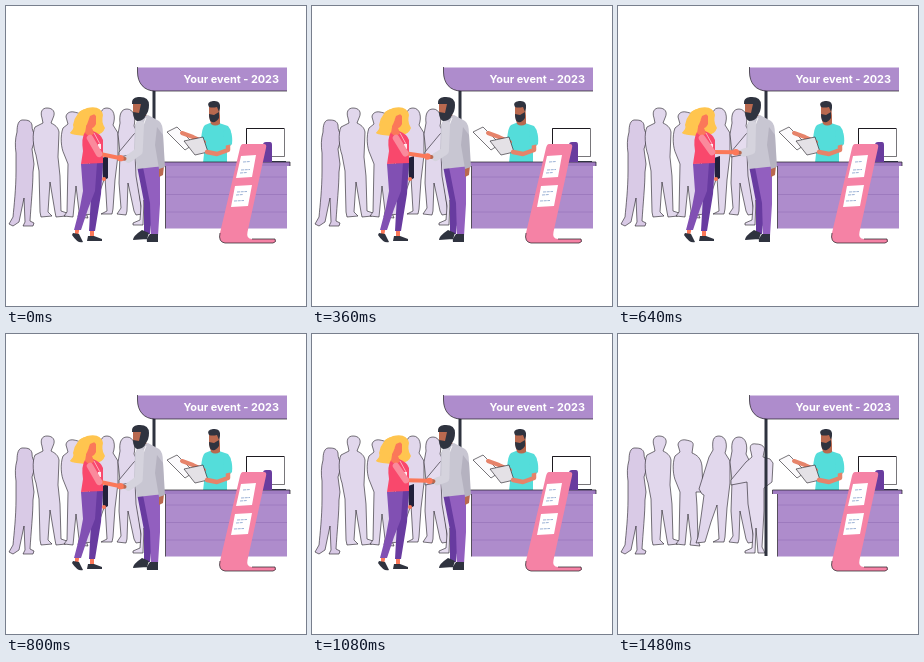
These frames come from a looping animation (300 px wide and 300 px high, 1.52 s). An HTML page:

```html
<!DOCTYPE html>
<html lang="en">
<head>
<meta charset="utf-8">
<title>Event desk</title>
<style>
  html, body { margin: 0; width: 100%; height: 100%; overflow: hidden; background: #fff; }
  svg { display: block; width: 100vw; height: 100vh; }
  text { font: 700 10.9px Inter, sans-serif; fill: #fff; text-anchor: end; }
  .edge { stroke: #1d1a20; stroke-width: .6; stroke-linejoin: round; }
  .rim { fill: none; stroke: #1d1a20; }
  .limb { fill: none; stroke-linecap: round; stroke-linejoin: round; }
  .dark { fill: #2f333f; }
  .tan { fill: #b9694f; }
  .skin { fill: #fb7859; }
</style>
</head>
<body>
<svg viewBox="0 0 300 300">
  <!-- crowd -->
  <g class="edge" fill="#e1d7ec">
    <path fill="#d9cae6" d="M18 114C12 113 11 120 11 126C9 133 9 140 10 147L10 165C10 183 8 200 7 211L3 218L7 220L13 216L18 192L19 216L17 220H27L28 217L24 215C25 199 27 179 27 166L28 158L26 143L30 130C27 126 26 124 26 119C25 115 22 114 18 114Z"/>
    <path d="M41 102C36 102 34 106 36 112L37 117L29 121C26 127 27 141 30 149L33 165L34 206L35 211L46 210L42 206L44 176L49 206L50 211L60 210L61 207L55 205L54 170L52 151L53 126C52 121 49 119 45 117L47 112C50 106 47 102 41 102Z"/>
    <path d="M68 106C63 105 60 108 60 111L62 118L57 122C54 130 55 142 58 148L62 158L61 206L58 210L67 211L70 180L73 205L72 211L82 212L80 207L79 172L78 158L85 158L84 132C83 124 79 121 74 119L75 112C76 108 73 107 68 106Z"/>
    <path d="M101 102C95 102 94 107 95 116L91 123L86 139L81 155L84 160L86 161L83 183L80 203L78 209L87 208L93 188L99 171L101 205L95 208L106 208L107 203L109 174L112 149L112 127L107 119C110 111 108 102 101 102Z"/>
    <path d="M121 103C115 103 113 109 114 117L112 128L114 147L113 177L115 202L111 208L120 209L121 205L122 177L128 205L130 209L136 208L132 176L132 128L128 120C130 112 128 103 121 103Z"/>
    <path fill="#e5dcef" d="M138 110C133 109 131 112 133 118L134 123L128 128L113 146L113 151L129 148L130 170L135 200L134 214L127 217V219H137L138 194L140 219H147L144 213L146 177L146 154L154 148L155 129L152 125L145 123L146 118C148 113 144 110 138 110Z"/>
  </g>

  <!-- booth -->
  <path class="dark" d="M146.500 84h3V222h-3z"/>
  <path fill="#ae8ccc" d="M131.500 61.500H281V85H149C138 85 131.500 77 131.500 66Z"/>
  <path class="rim" stroke-width=".7" d="M131.500 61V66C131.500 77 138 85 149 85H281"/>
  <text x="273" y="77">Your event - 2023</text>

  <!-- clerk -->
  <path fill="#54ddda" d="M204 117L199 119Q196 121 195 134L199 139L197 157H221V143L226 138Q226 124 222 120L213 117Z"/>
  <path class="tan" d="M203 100L213 99L214 110L214 118Q209 121 205 118L203 110Z"/>
  <path class="dark" d="M203 101Q200 96 207 95Q215 94 214 102L213 106L211 101Q206 102 203 101ZM203 108L208 109L213 106L213 112Q210 117 206 116Q203 115 203 108Z"/>
  <path class="edge" fill="#fbfafc" d="M161 126L171 121L188 138L179 144Z"/>
  <path class="limb" stroke="#e6836a" stroke-width="4" d="M198 136L187 131L176 127"/>
  <path class="edge" fill="#e4e1e6" d="M178 135L197 131L202 146L189 149Z"/>
  <path class="limb" stroke="#e6836a" stroke-width="4.500" d="M222 138L222 144L211 148L201 146"/>
  <path fill="#54ddda" d="M217 125L224 123Q227 131 226 138L218 140Z"/>

  <!-- counter and screen -->
  <path fill="#ae8ccc" d="M159.500 159H281V222.500H159.500Z"/>
  <path stroke="#9a76bb" stroke-width=".8" d="M160 171H281M160 188.500H281M160 206H281"/>
  <path fill="#a07cc2" d="M154.500 156H284V160H154.500Z"/>
  <path class="rim" stroke-width=".7" d="M154.500 160V156H284V160M159.500 160V222.500"/>
  <path class="edge" fill="#fff" d="M240.500 122.500H278.500V150.500H240.500Z"/>
  <path class="rim" d="M240.500 150V122.500H278"/>
  <path class="dark" d="M254 155h26v1h-26z"/>
  <path fill="#693c9e" d="M257 139Q257 136 260 136H264Q266 136 266 139V156H257Z"/>

  <!-- totem -->
  <path fill="#f582a5" d="M237 138H258Q261 138 260 142L241.500 226Q240 233 246 233H269Q271 236 267 237H219Q212 236 214 227L234 142Q235 138 237 138Z"/>
  <path class="rim" stroke-width=".7" d="M214 227Q212 236 219 237H267Q271 236 269 233H246"/>
  <path fill="#fff" d="M235 150L250 149L246 171L230 172ZM229 180L246 179L242 200L225 201Z"/>
  <path stroke="#9db3d6" stroke-dasharray="3 .7" d="M237 156L244 155.500M235 164L244 163.500M234 167L241 166.500M231 186L241 185.500M230 189L237 188.500M228 195L238 194.500"/>

  <g id="pair">
    <!-- man -->
    <path fill="#683ba0" d="M131 160H144L147 197L144 228H138L138 196Z"/>
    <path fill="#925fbf" d="M137 161L154 160L154 198L152 230H145L144 197Z"/>
    <path class="dark" d="M136 224L143 227L141 233L127 234Q127 230 136 224ZM144 228H152V236H141Q140 233 144 228Z"/>
    <path class="tan" d="M153 160L158 160L157 169L153 171ZM127 98L138 96L141 113L133 115L127 106Z"/>
    <path fill="#c8c6d2" d="M132 113L142 109L153 115Q157 118 157 128L158 160L131 163L128 143L129 119Z"/>
    <path fill="#b5b2c0" d="M151 121L157 129L159 161L153 163L149 139Z"/>
    <path class="dark" d="M126 98Q125 92 132 91Q143 90 143 99Q143 105 140 109Q138 115 131 115Q127 113 127 106L133 107L135 98Z"/>
    <path fill="none" stroke="#f4f2f6" d="M140 112L134 127"/>
    <path fill="#e9e7ee" d="M132 127h4v7h-4z"/>
    <!-- woman -->
    <path fill="#22213b" d="M96 152L102 150L102 172L97 175Z"/>
    <circle class="skin" cx="98" cy="173" r="2"/>
    <path class="skin" d="M69 220H74L72 230H69ZM84 222H88V232H84Z"/>
    <path fill="#683ba0" d="M84 157L97 156L95 188L89 225H83L85 190Z"/>
    <path fill="#8150b3" d="M75 158L91 157L89 185L82 203L75 224H68L74 201L77 185Z"/>
    <path class="dark" d="M67 227L73 228L77 236Q72 238 66 229ZM82 230H88L96 233V235H81Z"/>
    <path fill="#ffc54f" d="M81 102Q95 99 97 109Q95 116 99 122Q96 130 88 128Q76 132 64 127Q69 124 67 119Q69 106 81 102Z"/>
    <path fill="#f9486c" d="M79 126L87 125Q95 128 97 134L97 157L75 158L77 145Q75 132 79 126Z"/>
    <path class="skin" d="M80 110Q87 105 90 110L90 118Q88 122 86 122L88 127L84 131L79 127L80 121Z"/>
    <path fill="#ffc54f" d="M73 106Q82 99 91 107L84 110Q82 118 77 125Q70 131 64 127Q70 121 73 106Z"/>
    <path fill="none" stroke="#ffd9df" stroke-width=".7" d="M88 127L94 138"/>
    <path fill="#ffe9ed" d="M92 138h3v5h-3z"/>
    <!-- handshake -->
    <path id="manSleeve" class="limb" stroke="#d5d3dd" stroke-width="8"/>
    <path id="manHand" class="limb" stroke="#b9694f" stroke-width="4"/>
    <path id="womanArm" class="limb" stroke="#fb7859" stroke-width="4"/>
    <path id="womanSleeve" class="limb" stroke="#fa8a9c" stroke-width="6.500"/>
    <circle id="grip" class="skin" r="3.200"/>
  </g>
</svg>
<script>
const LOOP = 1520, STEP = 40, SHAKE = 400, GONE = 1480;
const part = id => document.getElementById(id);
const line = (id, ...points) => part(id).setAttribute('d', 'M' + points.join('L'));

function pose(t) {
  part('pair').style.display = t >= GONE ? 'none' : '';
  const k = Math.cos(2 * Math.PI * (t / SHAKE - .1));
  const x = 116 - 1.8 * k, y = 149.500 + 3.3 * k;
  const elbow = [93.500 - .5 * k, 147 + k];
  line('womanSleeve', [84, 132], elbow);
  line('womanArm', elbow, [x, y]);
  line('manSleeve', [134, 119], [133 - .4 * k, 145 + .6 * k], [x + 8, y + .5]);
  line('manHand', [x + 4, y + .5], [x, y]);
  part('grip').setAttribute('cx', x);
  part('grip').setAttribute('cy', y);
}

const start = performance.now();
function draw() {
  const t = (performance.now() - start) % LOOP;
  pose(Math.floor(t / STEP) * STEP);
  requestAnimationFrame(draw);
}
draw();
</script>
</body>
</html>
```
